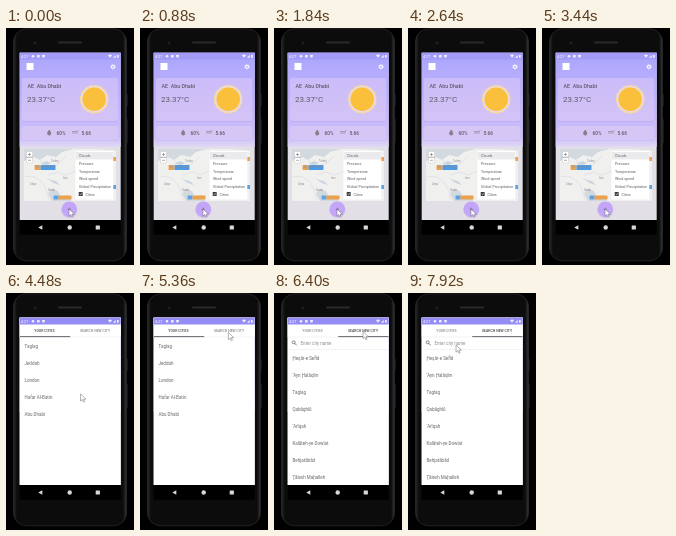
These frames come from a looping animation (128x237 px, 8 s). An HTML page:

```html
<!DOCTYPE html>
<html lang="en">
<head>
<meta charset="utf-8">
<title>Weather app</title>
<style>
html, body { margin: 0; width: 100%; height: 100%; overflow: hidden; background: #000; }
svg { display: block; width: 128px; height: 237px; }
text { font-family: Roboto, "Noto Sans", sans-serif; fill: #5c5a66; }
.list { font-size: 4.5px; fill: #66666a; }
.tab { font-size: 3.5px; font-weight: 500; text-anchor: middle; }
.layer { font-size: 3.7px; }
.tiny { font-size: 2.6px; fill: #8b8b90; }
</style>
</head>
<body>
<svg viewBox="0 0 128 237">
  <defs>
    <linearGradient id="sky" x1="0" y1="0" x2="0" y2="1">
      <stop offset="0" stop-color="#aaa5fd"/>
      <stop offset=".45" stop-color="#bdb1fc"/>
      <stop offset=".9" stop-color="#cdbffa"/>
      <stop offset="1" stop-color="#e0d9f3"/>
    </linearGradient>
    <linearGradient id="card" x1="0" y1="0" x2="0" y2="1">
      <stop offset="0" stop-color="#cbbcfa"/>
      <stop offset="1" stop-color="#d4c3f6"/>
    </linearGradient>
    <linearGradient id="body" x1="0" x2="1" y1="0" y2="0">
      <stop offset="0" stop-color="#2b2b2d"/>
      <stop offset=".03" stop-color="#0c0c0d"/>
      <stop offset=".97" stop-color="#0c0c0d"/>
      <stop offset="1" stop-color="#363638"/>
    </linearGradient>
    <clipPath id="screen"><rect x="13.7" y="24.7" width="101" height="167.2"/></clipPath>
    <clipPath id="mapBox"><rect x="18" y="121" width="92" height="52"/></clipPath>
  </defs>

  <!-- phone -->
  <path d="M120 66h1.500v12H120zM120 91h1.500v24H120z" fill="#29292b"/>
  <rect x="7.500" y=".8" width="113" height="232" rx="13" fill="url(#body)" stroke="#29292b" stroke-width=".8"/>
  <rect x="52" y="13.500" width="24" height="2" rx="1" fill="#2a2a2c"/>
  <circle cx="29" cy="15" r="1.600" fill="#1c1e22"/>
  <rect x="13.700" y="24.700" width="101" height="182" fill="#000"/>

  <g clip-path="url(#screen)">
    <g id="home">
      <rect x="13" y="24" width="103" height="169" fill="#e2dfe7"/>
      <rect x="13" y="24" width="103" height="95" fill="url(#sky)"/>
      <rect x="13" y="24" width="103" height="7.500" fill="#a29cf8"/>
      <rect x="20.500" y="35" width="7" height="7" fill="#fff"/>
      <circle cx="107" cy="38.700" r="1.500" fill="none" stroke="#fff" stroke-width="1.100"/>
      <circle cx="107" cy="38.700" r="2.300" fill="none" stroke="#fff" stroke-width=".7" stroke-dasharray=".9 .906"/>

      <rect x="16" y="50.800" width="96" height="43" rx="2" fill="#a89be5" opacity=".45"/>
      <rect x="16" y="50" width="96" height="43" rx="2" fill="url(#card)"/>
      <text x="21.500" y="60.200" font-size="5.300" font-weight="500">AE&#160; Abu Dhabi</text>
      <text x="21" y="74.300" font-size="8">23.37°C</text>
      <g id="sun" transform="translate(88.200 71.300)"></g>

      <rect x="16" y="98.800" width="96" height="14" rx="2" fill="#a89be5" opacity=".25"/>
      <rect x="16" y="98" width="96" height="14" rx="2" fill="#d6c6f5"/>
      <path d="M43.200 101.500c1.300 1.800 2 2.800 2 4a2 2 0 0 1-4 0c0-1.200.7-2.200 2-4z" fill="#85808d"/>
      <text x="50.500" y="107" font-size="4.800" font-weight="500">60%</text>
      <path d="M66 103.500h5q1.300-.3 1-1.300M66 105h6" fill="none" stroke="#85808d" stroke-width=".6"/>
      <text x="75.500" y="107" font-size="4.800" font-weight="500">5.66</text>

      <g clip-path="url(#mapBox)">
        <rect x="18" y="121" width="92" height="52" fill="#d2d9df"/>
        <path d="M18 133l10-4 6 3 7-5 9 2 6-5 15-4 39 2v52H66l-5-7-6 2-3-6-7-2-3 5 5 9-4 5H18z" fill="#f0f0ef"/>
        <path d="M18 148l11 1 6 4 5 8 3 11M42 147l10-3 8 3 10-4M34 132l8 6 10-2 8-8" fill="none" stroke="#dad7dd" stroke-width=".6"/>
        <path d="M40 149l5 3 5 1 4 4-4-1-4-2zM34 136l7 1 4-2-5-2z" fill="#ccd5dd"/>
        <text class="tiny" x="45" y="134">Turkey</text>
        <text class="tiny" x="24" y="157">Libya</text>
        <text class="tiny" x="42" y="163">Sudan</text>
        <text class="tiny" x="57" y="151">Iran</text>
        <rect x="28.500" y="137" width="6" height="5" rx=".7" fill="#eba24e"/>
        <rect x="34.500" y="137" width="15" height="5" rx=".7" fill="#4b9be6"/>
        <text class="tiny" x="29.800" y="140.400">23</text>
        <text class="tiny" x="36" y="140.400">Abu Dhabi</text>
        <rect x="47.500" y="167.500" width="5" height="4" rx=".5" fill="#5ba3e4"/>
        <rect x="52.500" y="167.500" width="13" height="4" rx=".5" fill="#eba24e"/>
        <rect x="107" y="129" width="3" height="4" fill="#eba24e"/>
        <rect x="107" y="157" width="3" height="4" fill="#5ba3e4"/>
      </g>
      <rect x="20.500" y="123.500" width="6" height="11.500" rx="1" fill="#fff" stroke="#c8c8cb" stroke-width=".5"/>
      <path d="M22 126.500h3M23.500 125v3M20.500 129.300h6M22 132.300h3" stroke="#777" stroke-width=".6"/>
      <rect x="69.500" y="123" width="37.800" height="48.500" rx="1" fill="#fff"/>
      <rect x="69.800" y="124" width="37.200" height="7.500" fill="#ebebed"/>
      <g id="layers"></g>
      <rect x="72.700" y="164" width="4" height="4" rx=".5" fill="#3b3b42"/>
      <path d="M73.600 166l.9.900 1.500-1.800" fill="none" stroke="#fff" stroke-width=".6"/>
      <text class="layer" x="79.500" y="167.500">Cities</text>

      <circle cx="63.300" cy="182.200" r="8" fill="#a996cd" opacity=".3"/>
      <circle cx="63.300" cy="181.300" r="7.800" fill="#c3a6f7"/>
      <path d="M61.700 181.300h3.200M63.300 179.700v3.200" stroke="#6f6086" stroke-width=".7"/>
      <circle id="ripple" cx="63.300" cy="181.300" r="7.800" fill="#fff" opacity="0"/>
    </g>

    <g id="cities">
      <rect x="13" y="24" width="103" height="180" fill="#fff"/>
      <g id="pager">
        <g id="own"></g>
        <g id="search">
          <circle cx="120.700" cy="49.300" r="1.500" fill="none" stroke="#55555c" stroke-width=".7"/>
          <path d="M121.800 50.400l1.900 1.900" stroke="#55555c" stroke-width=".8"/>
          <text x="127.500" y="51.700" font-size="4.500" style="fill:#8b8b90">Enter city name</text>
          <path d="M116 56.500h99" stroke="#e7e7ea" stroke-width=".5"/>
        </g>
      </g>
      <rect x="13" y="24" width="103" height="20" fill="#fff"/>
      <rect x="13" y="24" width="103" height="7.500" fill="#958df6"/>
      <path d="M13 44h103" stroke="#dfdfe3" stroke-width=".4"/>
      <text id="tabOwn" class="tab" x="38.500" y="39.300">YOUR CITIES</text>
      <text id="tabSearch" class="tab" x="89" y="39.300">SEARCH NEW CITY</text>
      <rect id="bar" y="43.200" width="50.500" height=".9" fill="#55555c"/>
    </g>

    <!-- status icons -->
    <text x="15" y="29.800" font-size="3.800" style="fill:#fff">4:27</text>
    <g fill="#fff" opacity=".85">
      <circle cx="27" cy="28.300" r="1.300"/>
      <rect x="31" y="27" width="2.600" height="2.600" rx=".4"/>
      <path d="M36 27h3l-.5 2.600h-2zM102 27.200q2-1.400 4 0l-2 2.500zM107 29.700h2.700V27zM111 27h1.700v2.800H111z"/>
    </g>
  </g>

  <!-- navigation -->
  <path d="M36.300 197.200v4.600l-4-2.300z" fill="#d8d8d8"/>
  <circle cx="63.700" cy="199.500" r="2.200" fill="#d8d8d8"/>
  <rect x="89.700" y="197.400" width="4.200" height="4.200" rx=".4" fill="#d8d8d8"/>

  <path id="cursor" d="M0 0v7.200l1.800-1.600 1.100 2.600 1.200-.5-1.100-2.500h2.400z" fill="#fff" stroke="#666" stroke-width=".5"/>
</svg>
<script>
const LOOP = 8000, STEP = 80, PAGE = 101;
const NS = "http://www.w3.org/2000/svg";
const $ = id => document.getElementById(id);

function add(parent, tag, attrs, text = "") {
  const el = document.createElementNS(NS, tag);
  for (const k in attrs) el.setAttribute(k, attrs[k]);
  el.textContent = text;
  $(parent).append(el);
  return el;
}

function addList(parent, items, x, y, gap, cls) {
  items.forEach((s, i) => add(parent, "text", { x, y: y + i * gap, class: cls }, s));
}

addList("layers", ["Clouds", "Pressure", "Temperature", "Wind speed", "Global Precipitation"],
  73, 129.3, 7.6, "layer");
addList("own", ["Taglag", "Jeddah", "London", "Hafar Al-Batin", "Abu Dhabi"],
  18.5, 54.7, 17, "list");
addList("search", ["Ḩeşār-e Sefīd", "‘Ayn Ḩalāqīm", "Taglag", "Qabāghlū", "‘Arīqah",
  "Kalāteh-ye Dowlat", "Behjatābād", "Ţālesh Maḩalleh"], 18.5 + PAGE, 66.7, 17.1, "list");

// disc inside a thin ring of short rays
add("sun", "circle", { r: 13.8, fill: "#ecd9dc" });
const rays = add("sun", "circle", {
  r: 13.7, fill: "none", stroke: "#f9dc8c", "stroke-width": 1.3, pathLength: 48, "stroke-dasharray": "2 1"
});
add("sun", "circle", { r: 11.7, fill: "#fac03c" });

// time, x, y
const path = [
  [0, 63, 181], [3500, 63, 181], [3900, 64, 181], [4240, 64, 181],
  [4400, 73, 108], [4800, 88, 40], [6160, 89, 38.5], [6800, 89, 38.5],
  [7760, 48, 52], [8000, 48, 52]
];
const clamp = v => Math.min(1, Math.max(0, v));
const phase = (t, a, b) => clamp((t - a) / (b - a));
const smooth = p => p * p * (3 - 2 * p);
const easeOut = p => 1 - (1 - p) ** 2;

function cursorAt(t) {
  const i = path.findIndex((p, n) => n && t <= p[0]);
  const [t0, x0, y0] = path[i - 1], [t1, x1, y1] = path[i];
  const p = smooth(phase(t, t0, t1));
  return [x0 + (x1 - x0) * p, y0 + (y1 - y0) * p];
}

function draw(t) {
  rays.setAttribute("transform", `rotate(${t * 0.03})`);

  const tap = phase(t, 4080, 4320);
  $("ripple").setAttribute("opacity", tap > 0 && tap < 1 ? 0.4 * (1 - tap) : 0);

  const open = easeOut(phase(t, 4200, 4400));
  $("cities").setAttribute("opacity", open);
  $("cities").setAttribute("transform", `translate(0 ${(1 - open) * 12})`);

  const swipe = easeOut(phase(t, 6160, 6400));
  $("pager").setAttribute("transform", `translate(${-PAGE * swipe} 0)`);
  $("bar").setAttribute("x", 13.7 + 50.5 * swipe);
  $("tabOwn").style.fill = swipe < 0.5 ? "#44444a" : "#88888e";
  $("tabSearch").style.fill = swipe < 0.5 ? "#88888e" : "#44444a";

  $("cursor").setAttribute("transform", `translate(${cursorAt(t)})`);
}

const start = performance.now();
function tick(now) {
  const t = Math.max(0, now - start) % LOOP;
  draw(Math.floor(t / STEP) * STEP);
  requestAnimationFrame(tick);
}
draw(0);
requestAnimationFrame(tick);
</script>
</body>
</html>
```
